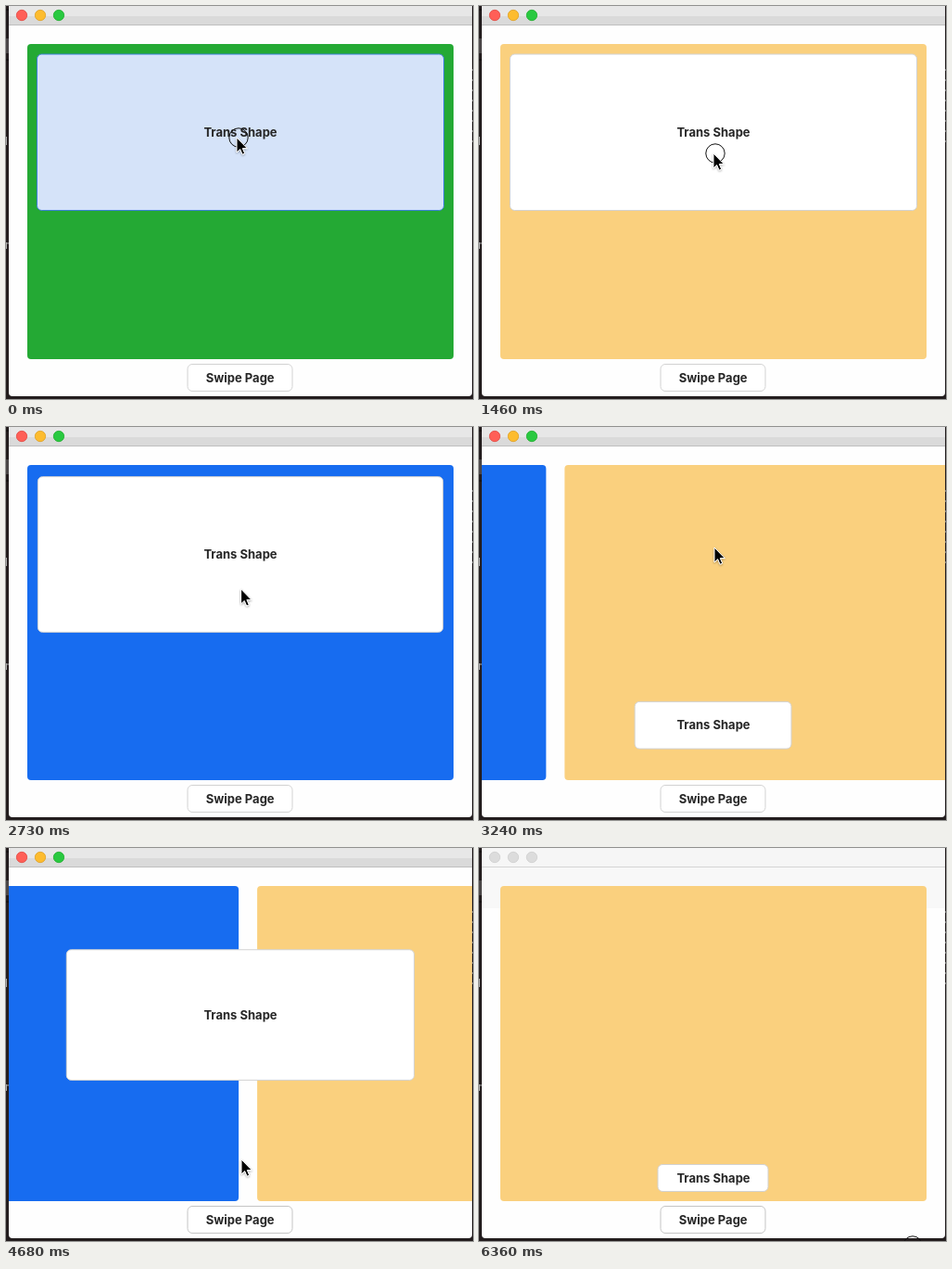
Animation of 504 by 424 pixels, one loop 6410 ms. Source, as an HTML page:

```html
<!DOCTYPE html>
<html lang="en">
<head>
<meta charset="utf-8">
<title>Trans Shape</title>
<style>
  html, body { margin: 0; width: 100%; height: 100%; overflow: hidden; background: #231d1e; }
  svg { display: block; width: 504px; height: 424px; }
  text { font: 700 13px Inter, sans-serif; fill: #262626; text-anchor: middle; }
</style>
</head>
<body>
<svg viewBox="0 0 504 424">
  <defs>
    <clipPath id="window"><path d="M3 0H503V417Q503 421 499 421H7Q3 421 3 417Z"/></clipPath>
    <filter id="shadow" x="-50%" y="-50%" width="200%" height="200%">
      <feDropShadow dx="0" dy="1" stdDeviation="1" flood-opacity=".35"/>
    </filter>
  </defs>

  <rect width="504" height="424" fill="#231d1e"/>
  <path d="M0 35H3V51H0Z" fill="#4b4748"/>
  <path d="M0 4H3M0 58H3" stroke="#0d0b0b"/>
  <path d="M.5 141V150M.5 255V262M1 256H3" stroke="#aaa"/>
  <path d="M503.5 68V150" stroke="#777" stroke-dasharray="2 9"/>

  <g clip-path="url(#window)">
    <rect x="3" width="500" height="424" fill="#fefefe"/>
    <rect id="veil" x="3" y="21" width="500" height="44" fill="#f8f8f8"/>
    <rect id="barTop" x="3" width="500" height="11"/>
    <rect id="barLow" x="3" y="11" width="500" height="9"/>
    <rect id="barLine" x="3" y="20" width="500" height="1"/>
    <g id="lights" stroke-width=".8">
      <circle cx="17" cy="10" r="5.7"/>
      <circle cx="37" cy="10" r="5.7"/>
      <circle cx="57" cy="10" r="5.7"/>
    </g>
    <g id="pages"></g>
    <g id="swipe"><rect rx="5"/><text>Swipe Page</text></g>
    <g id="trans"><rect rx="5"/><text>Trans Shape</text></g>
  </g>

  <circle id="ring" r="10.2" fill="none" stroke="#111"/>
  <path id="cursor" d="M0 0V16L3.7 12.6L6.1 18.2L8.7 17.1L6.3 11.6H11.3Z"
        stroke="#fff" stroke-linejoin="round" filter="url(#shadow)"/>
</svg>

<script>
const LOOP = 6410, PAGE_MS = 305, SHAPE_MS = 600, PAGE_STEP = 480;
const BLUE = 0, YELLOW = 1, GREEN = 2;
const PAGE_COLORS = ['#176cf0', '#fad07e', '#24a934'];
const LIGHTS = [['#ff5f57', '#e2463f'], ['#fdbc2f', '#dfa023'], ['#29c940', '#1dad2b']];
const SMALL = [193, 341.5, 119, 29], BIG = [33.5, 52, 439, 168.5], SWIPE = [196, 386.5, 113, 29];

// Each click: start, resulting page, resulting size, button
const CLICKS = [
  [55, BLUE, 0, 'trans'],
  [780, YELLOW, 1, 'trans'],
  [1540, GREEN, 0, 'trans'],
  [2285, BLUE, 1, 'trans'],
  [3017, YELLOW, 0, 'trans'],
  [3880, GREEN, 0, 'swipe'],
  [4481, BLUE, 1, 'trans'],
  [5097, YELLOW, 0, 'trans']
].map(([at, page, big, button]) => ({ at, page, big, button }));
const START = { page: GREEN, big: 1 };

// Pointer tip: time, x, y
const POINTER = [
  [0, 249, 142], [120, 249, 142], [590, 251, 350], [850, 251, 350],
  [1340, 253, 159], [1580, 253, 159], [2130, 252, 347], [2340, 252, 347],
  [2900, 254, 130], [3240, 254, 130], [3470, 253, 350], [3650, 253, 398],
  [4240, 253, 398], [4480, 253, 357], [4680, 254, 336], [5050, 260, 154],
  [5360, 260, 154], [5820, 466, 429], [LOOP, 466, 429]
];

const CADENCE = [[0, 25], [1460, 13], [2200, 18], [3240, 25], [4680, 12], [5360, 17], [6360, 1], [LOOP, 1]];

const $ = id => document.getElementById(id);
const clamp = v => Math.min(1, Math.max(0, v));
const mix = (a, b, p) => a + (b - a) * p;
const inOutQuad = p => p < .5 ? 2 * p * p : 1 - 2 * (1 - p) ** 2;
const outQuart = p => 1 - (1 - p) ** 4;

function set(el, attrs) {
  for (const name in attrs) el.setAttribute(name, attrs[name]);
}

function hold(t) {
  const i = CADENCE.findLastIndex(([at]) => at <= t);
  const [from, count] = CADENCE[i], step = (CADENCE[i + 1][0] - from) / count;
  return from + Math.floor((t - from) / step + .001) * step;
}

function pointerAt(t) {
  const i = Math.max(1, POINTER.findIndex(([at]) => at > t));
  const [t0, x0, y0] = POINTER[i - 1], [t1, x1, y1] = POINTER[i];
  const p = inOutQuad((t - t0) / (t1 - t0));
  return [mix(x0, x1, p), mix(y0, y1, p)];
}

function drawButton(id, [x, y, width, height], pressed, border) {
  const [rect, label] = $(id).children;
  set(rect, {
    x, y, width, height,
    fill: pressed ? '#d5e3f9' : '#fff',
    stroke: pressed ? '#3d80d8' : border
  });
  set(label, { x: id === 'trans' ? 253 : 252.7, y: y + height / 2 + 4.6 });
}

const pages = PAGE_COLORS.map(fill => {
  const rect = document.createElementNS('http://www.w3.org/2000/svg', 'rect');
  set(rect, { y: 41, width: 460, height: 340, rx: 4, fill });
  return $('pages').appendChild(rect);
});

function drawPages(position) {
  pages.forEach((rect, i) => {
    const x = 23 + (i - position) * PAGE_STEP;
    const inView = x + 460 > 23 && x < 483;
    set(rect, { x, visibility: inView ? 'visible' : 'hidden' });
  });
}

function drawTitleBar(active) {
  $('barTop').setAttribute('fill', active ? '#e7e7e7' : '#f6f6f6');
  $('barLow').setAttribute('fill', active ? '#dadada' : '#f6f6f6');
  $('barLine').setAttribute('fill', active ? '#bfbfbf' : '#d5d5d5');
  $('veil').setAttribute('visibility', active ? 'hidden' : 'visible');
  [...$('lights').children].forEach((light, i) => {
    const [fill, stroke] = active ? LIGHTS[i] : ['#dcdcdc', '#cfcfcf'];
    set(light, { fill, stroke });
  });
}

function draw(t) {
  const last = CLICKS.findLastIndex(c => c.at <= t);
  const now = CLICKS[last] || START, before = CLICKS[last - 1] || START;
  const elapsed = t - (now.at ?? 0);
  const press = CLICKS.find(c => t >= c.at - 60 && t < c.at);
  const active = t < 6355;

  drawTitleBar(active);
  drawPages(mix(before.page, now.page, inOutQuad(clamp(elapsed / PAGE_MS))));

  const size = mix(before.big, now.big, outQuart(clamp(elapsed / SHAPE_MS)));
  const box = SMALL.map((v, i) => mix(v, BIG[i], size));
  drawButton('trans', box, press?.button === 'trans', '#d2d2d2');
  drawButton('swipe', SWIPE, press?.button === 'swipe', t < 3880 ? '#d2d2d2' : '#c4c4c4');

  const [x, y] = pointerAt(t);
  const ringOn = !active || CLICKS.some(c => t >= c.at - 81 && t < c.at + 40);
  $('cursor').setAttribute('transform', `translate(${x} ${y})`);
  set($('ring'), { cx: x + 2, cy: y, visibility: ringOn ? 'visible' : 'hidden' });
}

const began = performance.now();
function tick() {
  draw(hold((performance.now() - began) % LOOP));
  requestAnimationFrame(tick);
}
tick();
</script>
</body>
</html>
```
